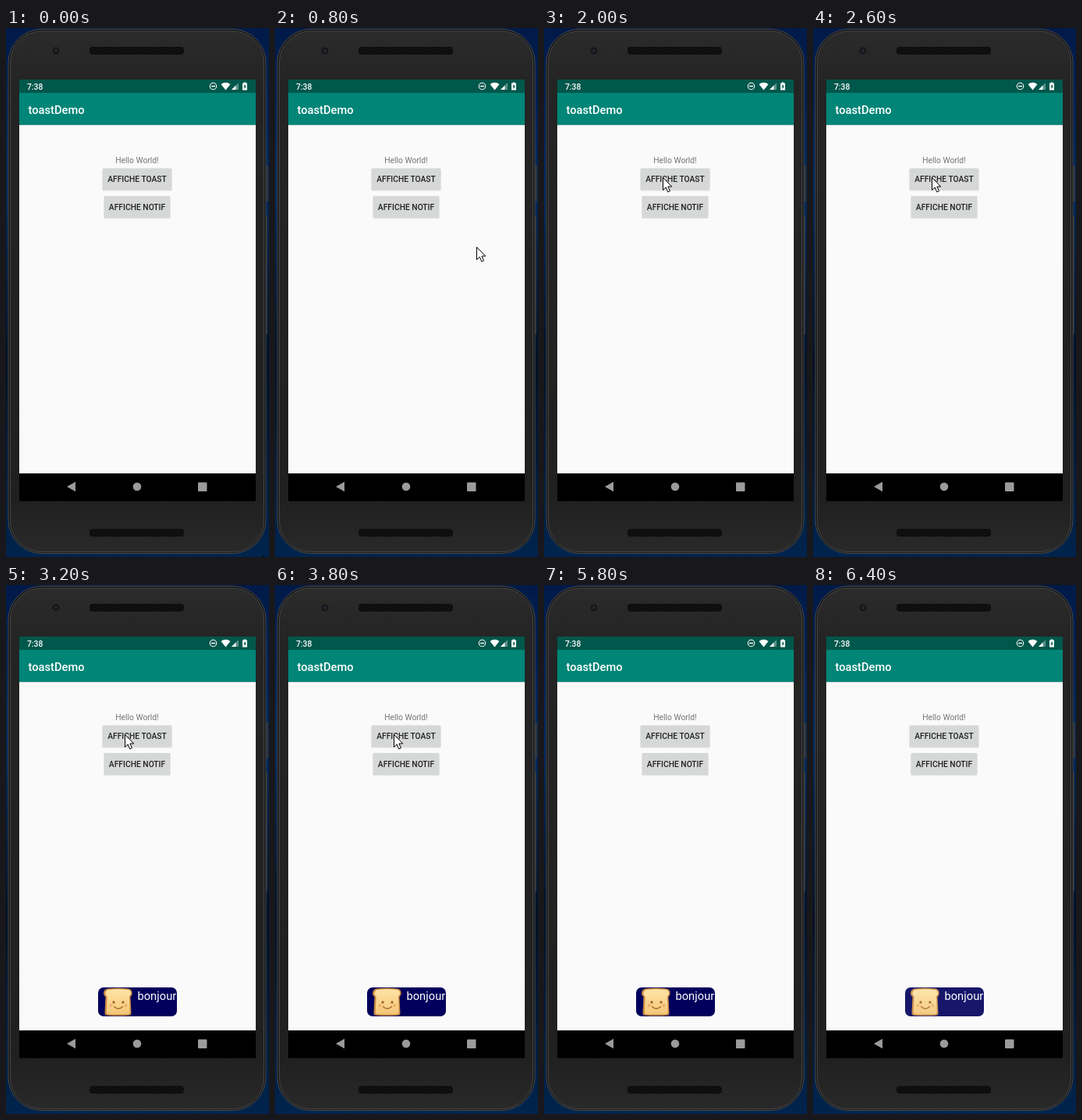
An HTML page that plays this animation: 337 px wide and 677 px high, repeating every 6.6 s.

```html
<!DOCTYPE html>
<html lang="fr">
<head>
<meta charset="utf-8">
<title>toastDemo</title>
<style>
  html, body { margin: 0; width: 100%; height: 100%; overflow: hidden; background: #001f47; }
  svg { display: block; width: 337px; height: 677px; font-family: Roboto, sans-serif; }
  .medium { font-weight: 500; }
  #cursor { animation: point 6.6s step-end infinite; }
  #toast { opacity: 0; animation: toast 6.6s step-end infinite; }

  @keyframes point {
    0% { transform: translate(329px, 675px); }
    3.03% { transform: translate(322px, 610px); }
    6.06% { transform: translate(304px, 500px); }
    9.09% { transform: translate(282px, 385px); }
    12.12% { transform: translate(258px, 280px); }
    15.15% { transform: translate(240px, 215px); }
    18.18% { transform: translate(231px, 191px); }
    24.24% { transform: translate(205px, 191px); }
    27.27% { transform: translate(174px, 191px); }
    30.3% { transform: translate(152px, 191px); }
    60.6% { transform: translate(200px, 280px); }
    63.63% { transform: translate(270px, 430px); }
    66.66% { transform: translate(318px, 590px); }
    69.69%, 100% { transform: translate(345px, 690px); }
  }
  @keyframes toast {
    0% { opacity: 0; }
    45.45% { opacity: .6; }
    48.48% { opacity: 1; }
    96.96%, 100% { opacity: .91; }
  }
</style>
</head>
<body>
<svg viewBox="0 0 337 677">
  <defs>
    <linearGradient id="desk" x2="0" y2="1">
      <stop stop-color="#001a48"/><stop offset=".3" stop-color="#002a5c"/>
      <stop offset=".63" stop-color="#001128"/><stop offset="1" stop-color="#00244d"/>
    </linearGradient>
    <linearGradient id="shell" x2="0" y2="1">
      <stop stop-color="#2b2b2b"/><stop offset=".1" stop-color="#242424"/>
      <stop offset=".9" stop-color="#202020"/><stop offset="1" stop-color="#292929"/>
    </linearGradient>
    <pattern id="mesh" width="4" height="4" patternUnits="userSpaceOnUse">
      <path fill="#0c0c0c" d="M0 0h4v4h-4z"/>
      <path fill="#232323" d="M0 0h1v1h-1zM2 2h1v1h-1z"/>
    </pattern>
    <linearGradient id="crumb" x2="0" y2="1">
      <stop stop-color="#ffe4a5"/><stop offset="1" stop-color="#f3c677"/>
    </linearGradient>
    <clipPath id="card"><rect x="118" y="515" width="101" height="37" rx="7"/></clipPath>
  </defs>

  <!-- Desktop and phone -->
  <path fill="url(#desk)" d="M0 0h337v677H0z"/>
  <path fill="#30343a" d="M332 176h4v46h-4zM332 240h3v152h-3z"/>
  <rect x="3" y="1.5" width="330" height="671" rx="43" fill="#121315" stroke="#4d4d4d"/>
  <rect x="5.5" y="4" width="325" height="666.5" rx="40" fill="url(#shell)" stroke="#484848"/>
  <circle cx="64" cy="29" r="4.5" fill="#161719"/>
  <circle cx="64" cy="29" r="2" fill="#252a35"/>
  <rect x="107" y="24" width="121" height="10" rx="4" fill="url(#mesh)"/>
  <rect x="107" y="641" width="121" height="10" rx="4" fill="url(#mesh)"/>

  <!-- App -->
  <path fill="#fafafa" d="M17 66h303v504H17z"/>
  <path fill="#008577" d="M17 83h303v41.5H17z"/>
  <path fill="#00574b" d="M17 66h303v17H17z"/>
  <path fill="#d8d8d8" d="M17 124h303v1H17z"/>
  <g fill="#fff" class="medium">
    <text x="27" y="78.5" font-size="10.3">7:38</text>
    <text x="28.5" y="109.5" font-size="14.7">toastDemo</text>
  </g>
  <g fill="#fff">
    <circle cx="265.5" cy="74.5" r="4.2" fill="none" stroke="#fff" stroke-width="1.1"/>
    <path d="M263 73.8h5v1.4h-5zM275.5 72q6-4.6 12 0l-6 7.5z"/>
    <path d="M298 70v9h-9z" opacity=".35"/>
    <path d="M294.5 73.5V79H289z"/>
    <path d="M304.8 69.5h2.4v1h1.8V79.5h-6v-9h1.8z"/>
    <path fill="#00574b" d="M306.6 71.8l-2.3 3.7h1.4v2.7l2.1-3.7h-1.2z"/>
  </g>

  <g text-anchor="middle" font-size="10.3">
    <text x="168" y="172.7" fill="#757575">Hello World!</text>
    <rect x="123.5" y="180.5" width="89" height="28" rx="1.5" fill="#c5c5c5" opacity=".45"/>
    <rect x="123.5" y="179.5" width="89" height="28" rx="1.5" fill="#d6d7d7"/>
    <rect x="125.5" y="216" width="85" height="28" rx="1.5" fill="#c5c5c5" opacity=".45"/>
    <rect x="125.5" y="215" width="85" height="28" rx="1.5" fill="#d6d7d7"/>
    <g class="medium" fill="#222">
      <text x="168" y="197.3">AFFICHE TOAST</text>
      <text x="168" y="232.8">AFFICHE NOTIF</text>
    </g>
  </g>

  <!-- Navigation bar -->
  <path d="M17 570h303v35.5H17z"/>
  <g fill="#9b9b9b">
    <path d="M78 587l11-6.2v12.4z"/>
    <circle cx="168" cy="587" r="5.3"/>
    <rect x="246" y="581.5" width="11.5" height="11.5" rx="1"/>
  </g>

  <g id="toast">
    <g clip-path="url(#card)">
      <path fill="#00005c" d="M118 515h101v37H118z"/>
      <text x="168.5" y="531" font-size="14.7" fill="#fff">bonjour</text>
    </g>
    <path fill="#c98a40" d="M130 516.5q13.500-1.500 27 0c5.500 1 6 8 2.500 10.500l1 21q0 2.500-2.500 2.700-15 1-29 0-2.500-.2-2.500-2.700l1-21c-4-2.500-3-9.500 2.500-10.500z"/>
    <path fill="url(#crumb)" d="M131 518q13-1.300 25.500 0c4.500 1 4.500 6.500 1.500 8.500l.8 20.500q0 2-2 2.200-14 .8-26 0-2-.2-2-2.200l.8-20.500c-3.500-2-2.500-7.500 1.400-8.500z"/>
    <g fill="#a5662b">
      <circle cx="138" cy="534" r="1.7"/>
      <circle cx="150" cy="534" r="1.7"/>
      <path d="M138.500 539.500q5.500 5.500 11 0" fill="none" stroke="#a5662b" stroke-width="1.300" stroke-linecap="round"/>
    </g>
    <g fill="#eba968" opacity=".8">
      <circle cx="134.500" cy="538" r="2"/>
      <circle cx="153.500" cy="538" r="2"/>
    </g>
  </g>

  <path id="cursor" fill="#fff" stroke="#000" stroke-linejoin="round"
    d="M.5.5v16l3.700-3.600 2.600 6 2.700-1.200-2.600-5.700h4.900z"/>
</svg>
</body>
</html>
```
